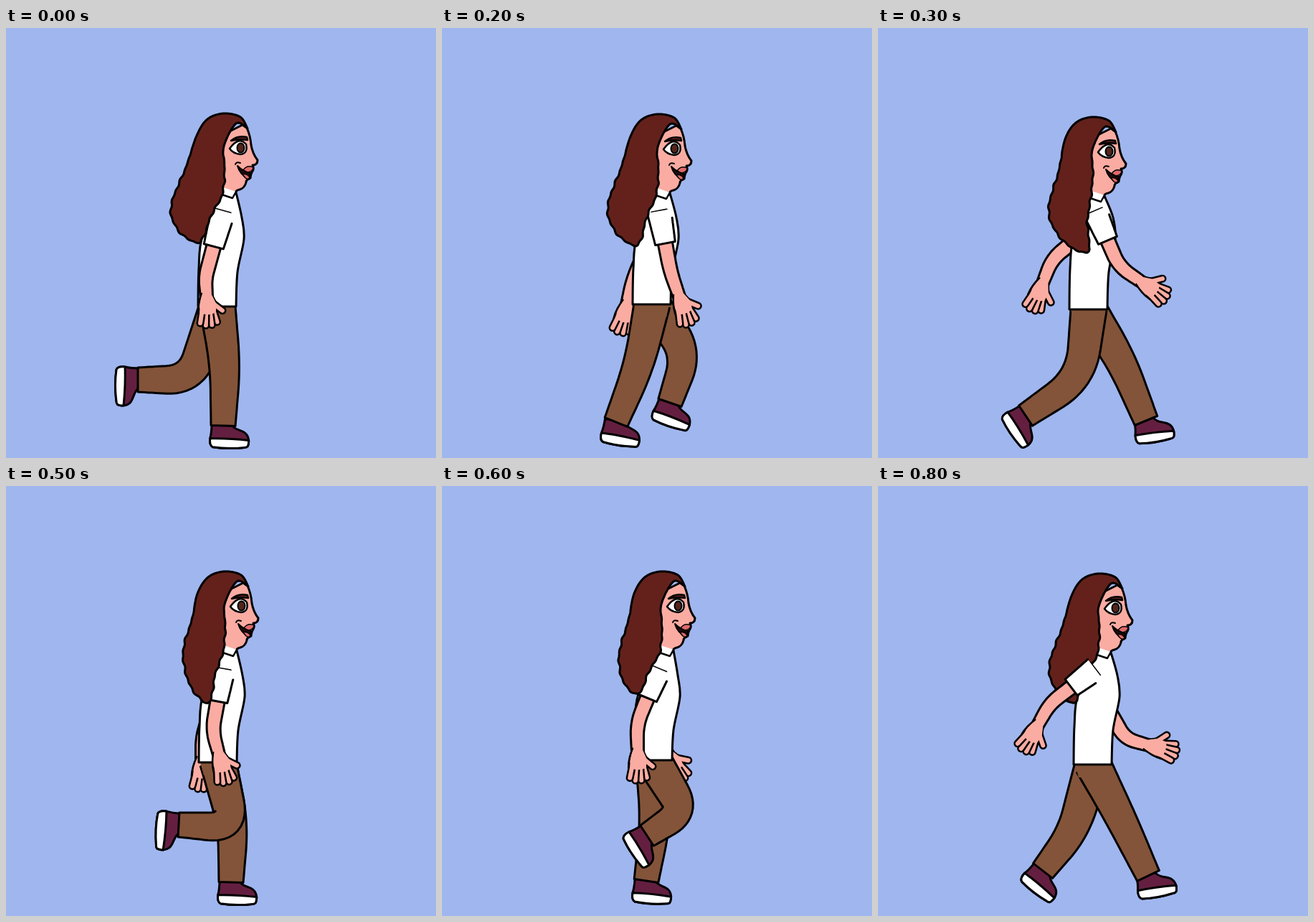
Write an HTML page that moves like this. It is 600x599 px and loops after 0.9 s.

```html
<!DOCTYPE html>
<html lang="en">
<head>
<meta charset="utf-8">
<title>Walk cycle</title>
<style>
html, body { margin: 0; width: 100%; height: 100%; overflow: hidden; background: #a0b6ef; }
svg { display: block; width: 100%; height: 100%; }
path, ellipse { stroke-linejoin: round; stroke-linecap: round; }
</style>
</head>
<body>
<svg id="stage" viewBox="0 0 600 599" preserveAspectRatio="none"></svg>
<script>
const SKIN = '#fbaca2', HAIR = '#64211c', PANTS = '#835439', SHOE = '#641f40', LIP = '#df696b', WHITE = '#fff';
const STEP = 100, STEPS = 9;
const SHOULDER = [303, 255], FAR_SHOULDER = [300, 275];

// Key poses: legs are knee and ankle, arms elbow and wrist, hair its widest point and tip.
const keys = [
  { step: 0, head: [0, 0], hip: [295, 388], hair: [230, 250, 267, 299],
    nearLeg: [306, 470, 303, 554], farLeg: [258, 490, 184, 490],
    nearArm: [278, 348, 280, 374], farArm: [295, 320, 295, 335] },
  { step: 2, head: [-3, 1], hip: [293, 385], hair: [231, 250, 269, 303],
    nearLeg: [275, 470, 243, 549], farLeg: [342, 452, 318, 522],
    nearArm: [319, 340, 331, 374], farArm: [266, 352, 258, 385] },
  { step: 3, head: [-5, 5], hip: [294, 392], hair: [238, 255, 286, 313],
    nearLeg: [283, 488, 206, 540], farLeg: [339, 462, 374, 547],
    nearArm: [336, 332, 368, 354], farArm: [243, 322, 230, 355] },
  { step: 5, head: [1, 0], hip: [296, 385], hair: [247, 232, 278, 302],
    nearLeg: [318, 476, 241, 472], farLeg: [317, 470, 314, 552],
    nearArm: [288, 340, 297, 374], farArm: [274, 350, 273, 382] },
  { step: 7, head: [3, 0], hip: [294, 379], hair: [247, 238, 264, 278],
    nearLeg: [358, 430, 331, 502], farLeg: [279, 465, 256, 548],
    nearArm: [256, 322, 249, 366], farArm: [333, 356, 358, 366] },
  { step: 8, head: [4, 3], hip: [300, 388], hair: [239, 250, 271, 302],
    nearLeg: [340, 465, 377, 543], farLeg: [272, 482, 230, 536],
    nearArm: [240, 303, 223, 333], farArm: [345, 352, 377, 361] }
];

const mix = (a, b, t) => a.map((v, i) => v + (b[i] - v) * t);
const shift = ([x, y], dx, dy) => [x + dx, y + dy];
const tilt = (a, b) => Math.atan2(a[0] - b[0], b[1] - a[1]) * 180 / Math.PI;
const halves = list => [list.slice(0, 2), list.slice(2)];
const trace = points => 'M' + points.map(p => p.map(v => v.toFixed(1))).join('L');
const shape = (d, fill, width = 3) =>
  `<path d="${d}" fill="${fill}" stroke="${width ? '#000' : 'none'}" stroke-width="${width}"/>`;
const place = (at, angle, scale, content) =>
  `<g transform="translate(${at}) rotate(${angle}) scale(${scale})">${content}</g>`;

function poseAt(step) {
  const after = keys.findIndex(key => key.step >= step);
  const b = keys[after], a = keys[Math.max(0, after - 1)];
  const t = b.step === a.step ? 0 : (step - a.step) / (b.step - a.step);
  const pose = {};
  for (const part in a) if (part !== 'step') pose[part] = mix(a[part], b[part], t);
  return pose;
}

// Catmull-Rom curve through a few points
function smooth(points) {
  const at = i => points[Math.max(0, Math.min(points.length - 1, i))];
  let path = 'M' + points[0];
  for (let i = 0; i < points.length - 1; i++) {
    const [p, q, r, s] = [at(i - 1), at(i), at(i + 1), at(i + 2)];
    path += `C${q.map((v, k) => v + (r[k] - p[k]) / 6)} ${r.map((v, k) => v - (s[k] - q[k]) / 6)} ${r}`;
  }
  return path;
}

// Both sides of a tapered limb with a rounded middle joint
function sides(top, joint, end, startWidth, endWidth) {
  const reach = Math.min(Math.hypot(joint[0] - top[0], joint[1] - top[1]),
    Math.hypot(end[0] - joint[0], end[1] - joint[1])) * 0.46;
  const toward = p => mix(joint, p, reach / Math.hypot(p[0] - joint[0], p[1] - joint[1]));
  const enter = toward(top), leave = toward(end), spine = [];
  for (let i = 0; i < 8; i++) spine.push(mix(top, enter, i / 8));
  for (let i = 0; i <= 12; i++) {
    const t = i / 12;
    spine.push(mix(mix(enter, joint, t), mix(joint, leave, t), t));
  }
  for (let i = 1; i <= 8; i++) spine.push(mix(leave, end, i / 8));
  const last = spine.length - 1, back = [], front = [];
  spine.forEach((p, i) => {
    const a = spine[Math.max(0, i - 1)], b = spine[Math.min(last, i + 1)];
    const half = (startWidth + (endWidth - startWidth) * i / last) / 2 / Math.hypot(b[0] - a[0], b[1] - a[1]);
    const dx = (b[1] - a[1]) * half, dy = (b[0] - a[0]) * half;
    back.push(shift(p, -dx, dy));
    front.push(shift(p, dx, -dy));
  });
  return { back, front };
}

function limb(top, joint, end, startWidth, endWidth, fill) {
  const { back, front } = sides(top, joint, end, startWidth, endWidth);
  return shape(trace([...back, ...front.reverse()]) + 'Z', fill);
}

function shoe(ankle, angle) {
  const sole = 'C39,27 37,28 33,28Q10,31 -11,28Q-16,26 -15,16';
  return place(ankle, angle, 1, '<g transform="translate(-3 2)">' +
    shape(`M-13,-4L14,-4C20,7 37,1 39,18${sole}Q-13,8 -13,-4Z`, SHOE) +
    shape(`M-15,16Q10,15 39,18${sole}Z`, WHITE) + '</g>');
}

// A foot follows its shin and flattens when it carries weight
function leg(hip, joints) {
  const [knee, ankle] = halves(joints);
  const planted = ankle[1] > 542;
  return shoe(ankle, tilt(knee, ankle) * (planted ? 0.4 : 1)) + limb(hip, knee, ankle, 50, 34, PANTS);
}

function hand(wrist, angle) {
  const palm = 'M-8,-3Q-12,12 -9,27Q6,33 19,23L17,10L8,-3';
  let drawing = shape(palm, SKIN);
  const finger = (from, turn, length) => {
    const a = turn * Math.PI / 180;
    const line = trace([from, [Math.sin(a) * length, Math.cos(a) * length]]);
    for (const [color, width] of [['#000', 12], [SKIN, 6.5]])
      drawing += `<path d="${line}" fill="none" stroke="${color}" stroke-width="${width}"/>`;
  };
  finger([9, 8], 56, 32);
  for (let i = 3; i >= 0; i--) finger([i * 6 - 4, 22], i * 12 - 6, 40 + 4 * Math.sin(Math.PI * (i + 0.5) / 4));
  return place(wrist, angle, 0.92, drawing + shape('M-7,-4Q-10,12 -7,26Q6,30 17,22L16,9L7,-4Z', SKIN, 0));
}

function arm(shoulder, joints) {
  const [elbow, wrist] = halves(joints);
  return limb(shoulder, elbow, wrist, 21, 17, SKIN) + hand(wrist, tilt(elbow, wrist) + 12);
}

function sleeve(elbow) {
  const cuff = mix(SHOULDER, elbow, 0.53);
  const { back, front } = sides(SHOULDER, mix(SHOULDER, cuff, 0.5), cuff, 34, 28);
  return shape(trace([...back, ...[...front].reverse()]) + 'Z', WHITE, 0) +
    shape(trace([...back, ...front.slice(8).reverse()]), 'none');
}

function torso([x, y], [dx, dy]) {
  const back = [[301 + dx, 229 + dy], [x - 21, 290], [x - 26, 335], [x - 27, y]];
  const front = [[x + 26, y], [x + 28, 340], [x + 37, 294], [x + 34, 264], [321 + dx, 229 + dy]];
  return shape(smooth(back) + smooth(front).replace('M', 'L') + 'Z', WHITE);
}

// Hides the leg lines where both thighs meet under the shirt
const pelvis = ([x, y]) =>
  shape(trace([[x - 25, y], [x + 24, y], [x + 20, y + 18], [x - 20, y + 18]]) + 'Z', PANTS, 0);

function face(offset) {
  return place(offset, 0, 1,
    shape('M300,231L300,150L330,135L336,139Q341,150 342,163Q344,175 351,184Q351,191 344,191' +
      'Q347,196 343,201Q341,205 341,209Q335,211 335,215Q333,223 326,225Q320,226 320,231', SKIN) +
    shape('M312,168Q325,150 335,162Q338,175 327,176Q317,175 312,168Z', WHITE, 2.5) +
    '<ellipse cx="327.5" cy="167" rx="5" ry="6.5" fill="#54241a" stroke="#000" stroke-width="2"/>' +
    shape('M314,157Q323,149 336,152L337,156Q325,154 314,157Z', HAIR, 2.5) +
    shape('M320,190Q321,186 327,188', 'none', 2) +
    shape('M323,192Q326,204 339,211L341,202Q331,200 323,192Z', '#210b0c', 2) +
    shape('M331,198Q336,190 345,194Q345,200 337,201Z', LIP, 1.5) +
    shape('M330,204Q336,202 340,208Q338,212 334,209Z', LIP, 1.5) +
    shape('M303,222L301,232L316,237L321,228', WHITE, 2.5));
}

// A smooth mane with ripples that grow below the temples
function mane(points, [dx, dy]) {
  const [wide, tip] = halves(points);
  const head = (x, y) => [x + dx, y + dy];
  const nape = head(302, 231);
  const outline = [
    head(337, 140), head(327, 124), head(304, 119), head(281, 127), head(266, 150),
    shift(mix(head(266, 150), wide, 0.45), 2, -3), wide,
    shift(mix(wide, tip, 0.5), -6, 10), tip,
    shift(tip, 9, -9), mix(tip, nape, 0.55), nape, head(305, 195), head(304, 165), head(321, 133), head(337, 140)
  ];
  const guide = document.createElementNS('http://www.w3.org/2000/svg', 'path');
  guide.setAttribute('d', smooth(outline));
  const rippled = [];
  for (let s = 0; s < guide.getTotalLength() - 1; s += 2) {
    const a = guide.getPointAtLength(s), b = guide.getPointAtLength(s + 1);
    const push = Math.max(0, Math.min(1, (a.y - 165) / 50)) * (0.7 * Math.sin(s / 2.5) + 0.5 * Math.sin(s / 4.1));
    rippled.push([a.x - (b.y - a.y) * push, a.y + (b.x - a.x) * push]);
  }
  return shape(trace(rippled) + 'Z', HAIR);
}

function figure(pose) {
  const elbow = pose.nearArm.slice(0, 2);
  const hair = mane(pose.hair, pose.head);
  const nearArm = arm(SHOULDER, pose.nearArm) + sleeve(elbow);
  const armBack = elbow[0] < 265;
  return arm(FAR_SHOULDER, pose.farArm) +
    leg(pose.hip, pose.farLeg) + leg(pose.hip, pose.nearLeg) + pelvis(pose.hip) +
    torso(pose.hip, pose.head) + face(pose.head) +
    (armBack ? hair + nearArm : nearArm + hair);
}

const stage = document.getElementById('stage');
stage.innerHTML = Array.from({ length: STEPS }, (_, step) =>
  `<g display="none">${figure(poseAt(step))}</g>`).join('');
const groups = [...stage.children];
const start = performance.now();

function draw() {
  const elapsed = Math.max(0, performance.now() - start);
  const current = Math.floor(elapsed / STEP) % STEPS;
  groups.forEach((group, i) => group.setAttribute('display', i === current ? 'inline' : 'none'));
  requestAnimationFrame(draw);
}
draw();
</script>
</body>
</html>
```
